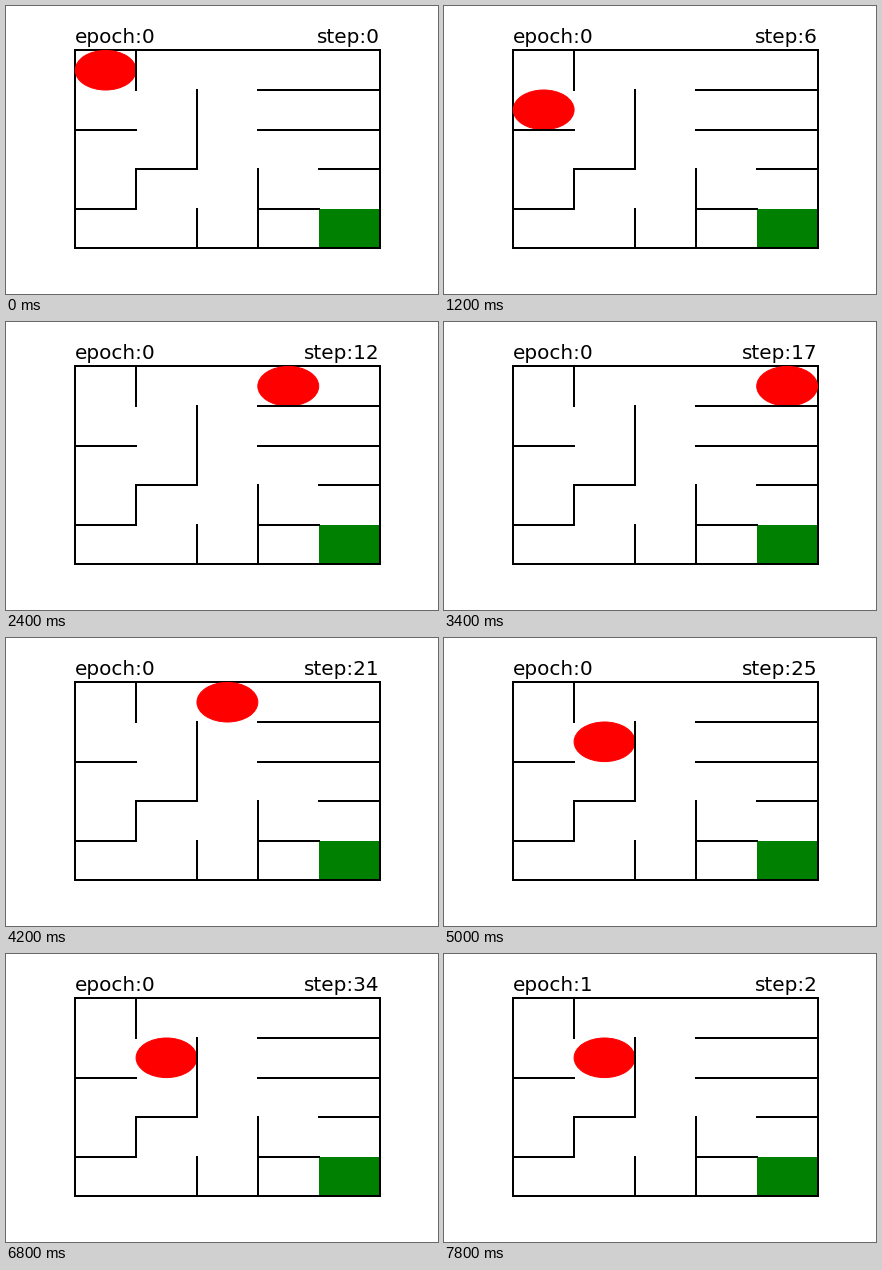
A matplotlib script that plays this animation: 432x288 px, repeating every 8 s.

```python
import matplotlib.pyplot as plt
from matplotlib.animation import FuncAnimation
from matplotlib.patches import Ellipse, Rectangle

W, H = 432, 288
COLS, ROWS = 5, 5
LEFT, TOP = 69.2, 44.4
CELL_W, CELL_H = 60.88, 39.6

# Inner walls: (column line, first row, last row) and (row line, first column, last column)
UPRIGHT = [(1, 0, 1), (2, 1, 3), (1, 3, 4), (3, 3, 5), (2, 4, 5)]
LEVEL = [(1, 3, 5), (2, 0, 1), (2, 3, 5), (3, 1, 2), (3, 4, 5), (4, 0, 1), (4, 3, 4)]

STEPS = {"U": (0, -1), "D": (0, 1), "L": (-1, 0), "R": (1, 0)}
EPOCHS = ["URDULDRUURURURURDLUDLDULDRDULDLUDRUL", "DR"]


def px(col):
    return LEFT + col * CELL_W


def py(row):
    return TOP + row * CELL_H


def blocked(col, row, dc, dr):
    if not (0 <= col + dc < COLS and 0 <= row + dr < ROWS):
        return True
    if dc:
        line = col + max(dc, 0)
        return any(c == line and a <= row < b for c, a, b in UPRIGHT)
    line = row + max(dr, 0)
    return any(r == line and a <= col < b for r, a, b in LEVEL)


def walk(moves):
    """Cells visited from the start; bumping into a wall costs a step."""
    col = row = 0
    cells = [(col, row)]
    for move in moves:
        dc, dr = STEPS[move]
        if not blocked(col, row, dc, dr):
            col, row = col + dc, row + dr
        cells.append((col, row))
    return cells


timeline = [(epoch, step, cell)
            for epoch, moves in enumerate(EPOCHS)
            for step, cell in enumerate(walk(moves))]

fig = plt.figure(figsize=(W / 72, H / 72), dpi=72, facecolor="white")
ax = fig.add_axes([0, 0, 1, 1])
ax.set_xlim(0, W)
ax.set_ylim(H, 0)
ax.axis("off")

ax.add_patch(Rectangle((px(4), py(4)), CELL_W, CELL_H, fc="green", ec="none", zorder=0.3))
ax.add_patch(Rectangle((LEFT, TOP), COLS * CELL_W, ROWS * CELL_H,
                       fill=False, ec="black", lw=2, zorder=0.5))
for c, a, b in UPRIGHT:
    ax.plot([px(c), px(c)], [py(a), py(b)], color="black", lw=2)
for r, a, b in LEVEL:
    ax.plot([px(a), px(b)], [py(r), py(r)], color="black", lw=2)

ball = ax.add_patch(Ellipse((px(0.5), py(0.5)), CELL_W, CELL_H, fc="red", ec="red", lw=1))
font = dict(family="DejaVu Sans", size=20, color="black", va="baseline")
epoch_text = ax.text(px(0), 37, "", ha="left", **font)
step_text = ax.text(px(COLS), 37, "", ha="right", **font)


def update(i):
    epoch, step, (col, row) = timeline[i]
    ball.set_center((px(col + 0.5), py(row + 0.5)))
    epoch_text.set_text(f"epoch:{epoch}")
    step_text.set_text(f"step:{step}")
    return ball, epoch_text, step_text


anim = FuncAnimation(fig, update, frames=len(timeline), interval=200,
                     init_func=lambda: update(0), repeat=True, repeat_delay=0)
plt.show()
```
